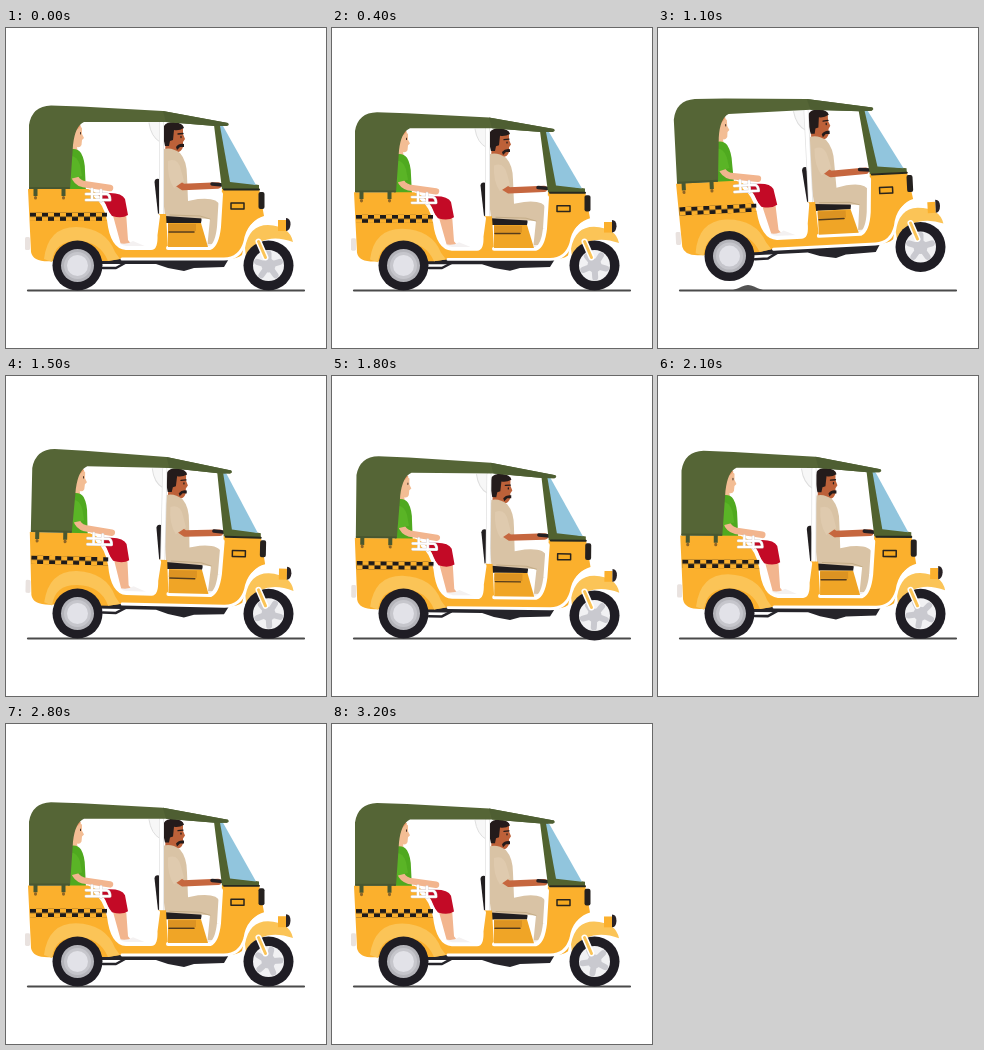
Recreate the animation shown at these times as an HTML page. Size 320 by 320 pixels, loop 3300 ms.

```html
<!DOCTYPE html>
<html lang="en">
<head>
<meta charset="utf-8">
<title>Rickshaw ride</title>
<style>
html, body { margin: 0; width: 100%; height: 100%; overflow: hidden; background: #fff; }
svg { display: block; width: 100vw; height: 100vh; }
</style>
</head>
<body>
<svg viewBox="0 0 320 320" stroke-linecap="round" stroke-linejoin="round">
  <defs>
    <pattern id="check" x="24" y="184.500" width="12" height="8.400" patternUnits="userSpaceOnUse">
      <path d="M0 0h6v4.200h6v4.200h-6v-4.200h-6z" fill="#1f1b1a"/>
    </pattern>
    <clipPath id="road"><rect x="21" y="250" width="278" height="14"/></clipPath>
  </defs>

  <g clip-path="url(#road)">
    <path id="bump" d="M-15 262Q-9 260 -6 258.500Q0 255.500 6 258.500Q9 260 15 262z" fill="#535353"/>
  </g>
  <path d="M22 262.500H298" stroke="#4a4a4a" stroke-width="2.200"/>

  <g id="body">
    <!-- chassis -->
    <path d="M92 229H224L218 239L188 240L178 243L162 240L150 236H92z" fill="#25242a"/>
    <path d="M97 240H110L119 235" fill="none" stroke="#25242a" stroke-width="2.500"/>

    <!-- passenger -->
    <path d="M68 99Q73 96 76 100L76 106L78 110L76 112L75.500 117Q74 120 71 119L72 125H65V99z" fill="#f3bd94"/>
    <path d="M66 98Q72 94 75 98L72 101Q69 102 68 108L65 112z" fill="#efa070"/>
    <path d="M74.500 104.500v1.500" stroke="#4a3428" stroke-width="1"/>
    <path d="M106 184L120 184L122 212L126 217H115z" fill="#f2b58e"/>
    <path d="M113 215Q121 217 127 213L141 219Q143 222 140 222H114z" fill="#f4f1f1"/>
    <path d="M62 165L104 165Q116 165 119 171L122 187Q116 191 106 188L98 177L62 180z" fill="#c30a26"/>
    <path d="M62 122Q71 119 75 125Q79 132 79 143L80 164H62z" fill="#4fa91f"/>
    <path d="M68 147Q70 154 77 156L104 160" fill="none" stroke="#f2b58e" stroke-width="6.500"/>
    <path d="M63 128Q71 127 74 137L76 148L64 151z" fill="#5ab426"/>

    <!-- driver seat -->
    <path d="M148.500 154Q149 150 153 151L156 183L152 186z" fill="#211e20"/>
    <path d="M156 187H192Q197 188 195 195H160z" fill="#211e20"/>

    <!-- driver -->
    <path d="M160 98Q170 93 177 98L177 106L179 111L177 114L177 119Q175 125 170 124L170 130H159z" fill="#bd6139"/>
    <path d="M158 98Q160 94 168 94Q177 95 178 100Q173 103 168 102L167 112L164 113L163 118H159Q156 106 158 98z" fill="#241b1b"/>
    <path d="M170 119Q173 115 178 116L178 119L174 119L171 122z" fill="#241b1b"/>
    <path d="M172 106L177 105.500M175 108.500v1" stroke="#241b1b" stroke-width="1.300"/>
    <path d="M158 121Q166 119 174 125Q181 133 181 148L182 173L192 171Q212 169 214 178L215 198L211 221H201L204 191L159 188Q156 164 157 142z" fill="#d9c3a5"/>
    <path d="M164 187L194 188L204 191" fill="none" stroke="#c4ad88" stroke-width="1"/>
    <path d="M201 216H209L217 220Q218 222 215 222H201z" fill="#f1eeee"/>
    <path d="M171 155L177 159L212 157.500" fill="none" stroke="#c6673f" stroke-width="6.500"/>
    <path d="M162 133Q172 129 175 142L178 153L168 160Q161 150 162 133z" fill="#dfcaae"/>
    <path d="M206 156L217 157L219 161" fill="none" stroke="#242024" stroke-width="3.500"/>

    <!-- pole and curtain -->
    <path d="M143 94Q145 109 154 114L158 94z" fill="#f7f7f7"/>
    <path d="M143 95Q145 109 154 114" fill="none" stroke="#dedede"/>
    <path d="M155.500 95V185" stroke="#e2e2e2" stroke-width="5"/>
    <path d="M155.500 95V185" stroke="#fff" stroke-width="3.500"/>

    <!-- lower shell -->
    <path d="M22 161H82Q97 166 101 181L106 208Q109 219 119 220H149L152 186H160L162 221H205Q212 215 214 199L216 160H253L258 188Q244 192 240 208L236 227Q231 231 221 231H114L102 233H48Q27 235 25 224z" fill="#fbb02d"/>
    <path d="M38 231Q42 199 70 199Q100 200 109 224L114 231L102 233Q94 213 71 213Q48 213 46 234z" fill="#fbc457"/>
    <path d="M90 168Q99 174 103 192Q106 219 120 220H145Q150 220 149.500 207L152 188" fill="none" stroke="#fff" stroke-width="4"/>
    <path d="M162 220H204Q211 217 213 199L215 166" fill="none" stroke="#fff" stroke-width="4"/>
    <path d="M116 231H218Q234 231 239 214Q242 194 259 191" fill="none" stroke="#fff" stroke-width="3"/>
    <path d="M162 195H195L202 219H162z" fill="#f0a526"/>
    <path d="M162 196H190V203H162z" fill="#dc9322"/>
    <path d="M163 204H188" stroke="#543b1c" stroke-width="1.500"/>
    <rect x="24" y="184.500" width="77" height="8.400" fill="url(#check)"/>
    <rect x="19" y="209" width="5" height="13" rx="1.500" fill="#e9e2df"/>

    <!-- front fender -->
    <path d="M239 220Q243 197 262 197Q284 198 287 214Q268 207 254 214Q246 218 240 229z" fill="#fbc457"/>
    <path d="M272 192H280V203H272z" fill="#fbb02d"/>
    <path d="M280 190Q284.500 190 284.500 196.500Q284 203 280 203z" fill="#292225"/>

    <!-- arm rail -->
    <path d="M80 166H101Q104 167 104 172M86 161V172M95 162V173M80 172H103" fill="none" stroke="#d8d4d4" stroke-width="3"/>
    <path d="M80 166H101Q104 167 104 172M86 161V172M95 162V173M80 172H103" fill="none" stroke="#fff" stroke-width="2"/>

    <!-- windscreen -->
    <path d="M208 97H216L227 153L253 157V161H216z" fill="#51622f"/>
    <path d="M214 98L217 98L250 157L224 154z" fill="#91c5dd"/>
    <path d="M218 161.500H253" stroke="#252820" stroke-width="2"/>

    <!-- front details -->
    <rect x="252.500" y="164" width="6" height="17" rx="2" fill="#25211f"/>
    <rect x="225" y="175" width="13" height="6" fill="#f6a91f" stroke="#2a241d" stroke-width="1.500"/>

    <!-- canopy -->
    <path d="M23 161V97Q26 78 45 77.500L75 78.500L157 83L222 95Q224 97 221 98L209 98L160 94H78Q69 98 67 117L64 161z" fill="#556536"/>
    <path d="M157 83L222 95L221 98L209 98L160 94z" fill="#4e5e32"/>
    <path d="M24 160H63" stroke="#485730" stroke-width="2"/>
    <path d="M29.500 160V168M57.500 160V168" stroke="#485730" stroke-width="4" stroke-linecap="butt"/>
    <path d="M29.500 169.500V170M57.500 169.500V170" stroke="#8f6526" stroke-width="3"/>
  </g>

  <g id="rear">
    <circle r="25" fill="#1f1d24"/>
    <circle r="16.500" fill="#b4b4ba"/>
    <circle r="13.500" fill="#c6c6cc"/>
    <circle r="10.500" fill="#e2e2e8"/>
  </g>
  <g id="front">
    <circle r="25" fill="#1f1d24"/>
    <circle r="15.500" fill="#f1f1f3"/>
    <g id="spokes"></g>
    <circle r="7" fill="#c9c9cf"/>
    <path d="M-10-24L-3-8" stroke="#fff" stroke-width="6"/>
    <path d="M-10-24L-3-8" stroke="#fbc457" stroke-width="3"/>
  </g>
</svg>
<script>
const LOOP = 3300, STEP = 100;
const $ = id => document.getElementById(id);

// time, lift, tilt in degrees, vertical stretch
const bodyKeys = [
  [0, 0, 0, 0], [100, 0, 0, .004], [350, 0, 0, -.045], [650, 0, 0, 0],
  [800, 0, -2, -.01], [1000, -2, -4.2, 0], [1100, -7.5, -2.9, .003],
  [1200, -11, -1.2, .006], [1300, -9, .4, .004], [1500, -4, 1.3, 0],
  [1800, 0, .6, -.018], [2100, 0, .2, .016], [2400, 0, 0, -.044],
  [2700, 0, 0, .007], [3000, 0, 0, -.04], [3300, 0, 0, 0]
];
const frontKeys = [[0, 0], [650, 0], [1000, -20], [1100, -18.5], [1400, 0], [1800, 2], [2200, 0], [3300, 0]];
const rearKeys = [[0, 0], [950, 0], [1150, -11], [1400, 0], [3300, 0]];

function sample(keys, t) {
  const i = keys.findIndex(k => k[0] > t);
  const a = keys[i - 1], b = keys[i];
  const p = (t - a[0]) / (b[0] - a[0]);
  const e = (1 - Math.cos(Math.PI * p)) / 2;
  return a.slice(1).map((v, n) => v + (b[n + 1] - v) * e);
}

const place = (id, value) => $(id).setAttribute("transform", value);

for (let i = 0; i < 5; i++) {
  $("spokes").innerHTML +=
    `<path d="M0-5V-12" transform="rotate(${i * 72})" stroke="#c9c9cf" stroke-width="6"/>`;
}

function draw(t) {
  const [lift, tilt, stretch] = sample(bodyKeys, t);
  place("body", `translate(71 ${240 + lift}) rotate(${tilt}) scale(1 ${1 + stretch}) translate(-71 -240)`);
  place("rear", `translate(71.500 ${237.5 + sample(rearKeys, t)[0]})`);
  place("front", `translate(262.500 ${237.5 + sample(frontKeys, t)[0]})`);
  place("spokes", `rotate(${t / LOOP * 9 * 360})`);
  place("bump", `translate(${290 - (t - 600) * .4} 0)`);
}

const start = performance.now();
function tick() {
  const t = (performance.now() - start) % LOOP;
  draw(Math.floor(t / STEP) * STEP);
  requestAnimationFrame(tick);
}
tick();
</script>
</body>
</html>
```
